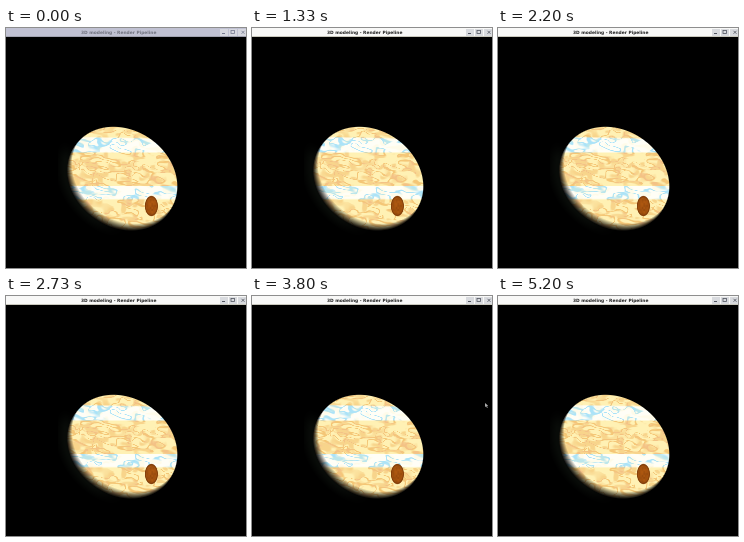
Write an HTML page with a canvas that moves like this. It is 240 by 240 pixels and loops after 5270 ms.

```html
<!DOCTYPE html>
<html lang="en">
<head>
<meta charset="utf-8">
<title>3D modeling</title>
<style>
  html, body { margin: 0; width: 100%; height: 100%; overflow: hidden; background: #000; }
  canvas { display: block; width: 240px; height: 240px; }
</style>
</head>
<body>
<canvas id="stage" width="240" height="240"></canvas>
<script>
const LOOP = 5270, STEP = 200 / 3;
const ctx = document.getElementById('stage').getContext('2d');
const planet = { x: 117, y: 149.5, long: 57.5, near: 47.5, cos: Math.cos(0.6), sin: Math.sin(0.6) };
const box = { x: 52, y: 96, w: 124, h: 112 };
const img = ctx.createImageData(box.w, box.h);

const CREAM = [255, 241, 180], ORANGE = [240, 184, 98], PINK = [243, 190, 150];
const WHITE = [255, 254, 246], BLUE = [150, 220, 248];
const SPOT = [174, 88, 16], RIM = [112, 52, 8], GLOW = [8, 11, 8];

const clamp = v => Math.max(0, Math.min(1, v));
const smooth = (a, b, v) => { const k = clamp((v - a) / (b - a)); return k * k * (3 - 2 * k); };
const mix = (a, b, k) => a.map((v, i) => v + (b[i] - v) * k);

function hash(x, y) {
  let h = Math.imul(x, 374761393) + Math.imul(y, 668265263);
  h = Math.imul(h ^ (h >>> 13), 1274126177);
  return ((h ^ (h >>> 16)) >>> 0) / 4294967296;
}

function noise(x, y) {
  const i = Math.floor(x), j = Math.floor(y);
  const u = smooth(0, 1, x - i), v = smooth(0, 1, y - j);
  const a = hash(i, j), b = hash(i + 1, j), c = hash(i, j + 1), d = hash(i + 1, j + 1);
  return a + (b - a) * u + (c - a + (a - b - c + d) * u) * v;
}

// Cloud colour: pale bands crossed by wavy streaks.
function cloud(x, y, dx, dy) {
  const px = x + dx, py = y + dy;
  const warp = noise(px * 0.13, py * 0.17) * 1.6;
  const n = noise(px * 0.09 + warp, py * 0.27 - px * 0.04 + warp);
  const m = noise(px * 0.17 + 40, py * 0.3 + warp);
  const streak = 1 - smooth(0.02, 0.15, Math.abs(n - 0.5));
  const patch = smooth(0.45, 0.8, m);
  const edge = 109 + (x - 75) * 0.02;
  const pale = smooth(edge - 1, edge + 1, y) * (1 - smooth(123.5, 125.5, y)) +
               smooth(157.5, 158.5, y) * (1 - smooth(170, 172.5, y));
  const warm = mix(mix(CREAM, ORANGE, Math.max(streak * 0.75, patch * 0.5)), PINK, patch * streak * 0.5);
  const cool = mix(mix(WHITE, BLUE, streak * 0.8), CREAM, patch * 0.2);
  return mix(warm, cool, pale);
}

function surface(x, y, dx, dy) {
  const color = cloud(x, y, dx, dy);
  const s = Math.hypot((x - 145.4) / 6.4, (y - 178) / 10);
  if (s > 1.12) return color;
  const grain = noise(x * 0.65, y * 0.5);
  const tone = mix(SPOT, RIM, Math.max(smooth(0.72, 0.95, s) * 0.7, grain * 0.45));
  return mix(tone, color, smooth(0.94, 1.08, s));
}

function drawPlanet(t) {
  const a = t / LOOP * Math.PI * 2;
  const dx = 5 * Math.sin(a), dy = 1.5 * (1 - Math.cos(a));
  for (let j = 0, k = 0; j < box.h; j++) {
    for (let i = 0; i < box.w; i++, k += 4) {
      const x = box.x + i + 0.5, y = box.y + j + 0.5;
      const px = x - planet.x, py = y - planet.y;
      const u = (px * planet.cos + py * planet.sin) / planet.long;
      const v = (py * planet.cos - px * planet.sin) / planet.near;
      const r = Math.hypot(u, v);
      const dark = clamp(v);
      // The edge softens toward the unlit side, with a faint tail beyond it.
      const light = clamp((1 - r) * 50 / (1 + 9 * dark) + 0.3);
      const tail = clamp((1.25 - r) * 6) * smooth(0, 0.4, dark) * smooth(0.6, -0.1, u);
      const color = light ? surface(x, y, dx, dy) : GLOW;
      for (let c = 0; c < 3; c++) img.data[k + c] = Math.max(color[c] * light, GLOW[c] * tail);
      img.data[k + 3] = 255;
    }
  }
  ctx.putImageData(img, box.x, box.y);
}

function rect(color, x, y, w, h) {
  ctx.fillStyle = color;
  ctx.fillRect(x, y, w, h);
}

function drawBar(fading) {
  rect(fading ? '#c0c1d2' : '#f8f8f7', 0, 0, 240, 8);
  rect(fading ? '#a2a3b0' : '#c9c8bd', 0, 8, 240, 1);
  ctx.fillStyle = fading ? '#727480' : '#222';
  ctx.font = 'bold 4.4px "DejaVu Sans", sans-serif';
  ctx.textAlign = 'center';
  ctx.textBaseline = 'alphabetic';
  ctx.fillText('3D modeling - Render Pipeline', 112.7, 5.7);
  for (const x of [214, 223, 232]) rect(fading ? '#d6d7df' : '#d8dade', x, 1, 8, 7);
  const ink = fading ? '#777b90' : '#50545f';
  rect(ink, 216, 5, 3, 1);
  ctx.strokeStyle = ink;
  ctx.lineWidth = 0.8;
  ctx.strokeRect(225, 2.5, 3.5, 3);
  ctx.beginPath();
  ctx.moveTo(235.5, 2.8); ctx.lineTo(238.5, 5.8);
  ctx.moveTo(238.5, 2.8); ctx.lineTo(235.5, 5.8);
  ctx.stroke();
}

function drawCursor(t) {
  if (t < 3780 || t > 4400) return;
  const k = smooth(3800, 4300, t);
  ctx.save();
  ctx.translate(233 + 3 * k, 107 + 116 * k);
  ctx.beginPath();
  ctx.moveTo(0, 0);
  ctx.lineTo(0, 4);
  ctx.lineTo(1.2, 3.2);
  ctx.lineTo(2, 5);
  ctx.lineTo(2.8, 4.6);
  ctx.lineTo(2, 3);
  ctx.lineTo(3.2, 2.8);
  ctx.closePath();
  ctx.fillStyle = '#aaa';
  ctx.fill();
  ctx.restore();
}

let last = -1;
function tick(now) {
  const step = Math.floor((now - start + LOOP) % LOOP / STEP);
  if (step !== last) {
    last = step;
    // Sampled just inside the step, so hard changes land on its start.
    const t = step * STEP + 1;
    rect('#000', 0, 0, 240, 240);
    drawPlanet(t);
    drawBar(step === 0);
    drawCursor(t);
  }
  requestAnimationFrame(tick);
}
const start = performance.now();
tick(start);
</script>
</body>
</html>
```
